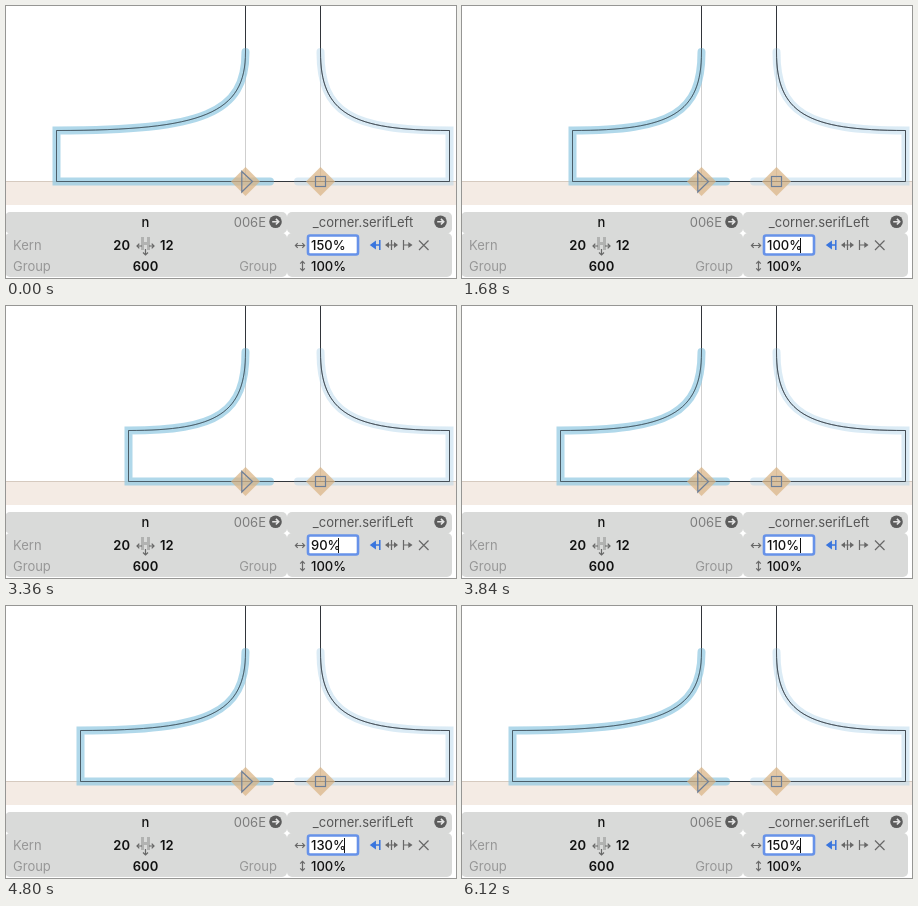
Recreate the animation shown at these times as an HTML page. Size 450 px wide and 272 px high, loop 6240 ms.

```html
<!DOCTYPE html>
<html lang="en">
<head>
<meta charset="utf-8">
<title>Corner component scale</title>
<style>
  html, body { margin: 0; width: 100%; height: 100%; overflow: hidden; background: #fff; }
  svg { display: block; width: 450px; height: 272px; }
  text { font: 500 13px Inter, sans-serif; fill: #111; }
  .dim { fill: #979797; font-weight: 400; }
  .mid { fill: #7c7c7c; font-weight: 400; }
  .name { fill: #555; font-weight: 400; }
  .bold { font-weight: 600; }
  .panel { fill: #d9dad9; }
  .line { fill: none; stroke: #33363b; stroke-width: 1; }
  .guide { stroke: #cfcfcf; stroke-width: 1; }
  .glow { fill: none; stroke-width: 8; stroke-linecap: round; stroke-linejoin: miter; }
  .node { fill: #d9b384; fill-opacity: .72; }
  .mark { fill: none; stroke: #6d7f98; stroke-width: 1.2; }
  .icon { fill: none; stroke: #686868; stroke-width: 1.2; }
  .head { fill: #686868; }
  .blue { stroke: #3975de; stroke-width: 1.5; }
  .blue.head { fill: #3975de; }
</style>
</head>
<body>
<svg viewBox="0 0 450 272">
  <defs>
    <g id="go">
      <circle r="6.3" fill="#5c5c5c"/>
      <path d="M-3.3 0H3M.4-2.8 3.2 0 .4 2.8" fill="none" stroke="#e4e4e4" stroke-width="1.6"/>
    </g>
    <path id="diamond" class="node" d="M0-14.5 14.5 0 0 14.5-14.5 0Z"/>
    <path id="sides" d="M-4.6 0H4.6M-2.3-2.3-4.6 0l2.3 2.3M2.3-2.3 4.6 0 2.3 2.3"/>
  </defs>

  <rect y="176" width="450" height="23" fill="#f4ebe4"/>
  <path class="guide" d="M0 175.5H450" style="stroke: #d6cabf"/>
  <path class="guide" d="M239.5 45V175M314.5 45V175"/>
  <path id="outline" class="line"/>
  <path id="rightGlow" class="glow" stroke="#a9d0e6" stroke-opacity=".42"/>
  <path id="leftGlow" class="glow" stroke="#8fc8e2" stroke-opacity=".7"/>
  <path id="core" class="line" stroke-opacity=".6"/>
  <use href="#diamond" x="239.5" y="175.5"/>
  <use href="#diamond" x="314.5" y="175.5"/>
  <path class="mark" d="M235.8 165.5 246.5 175.5 235.8 186Z"/>
  <rect class="mark" x="309.5" y="170.5" width="10" height="10"/>

  <rect class="panel" x="-1" y="206" width="282" height="21.5" rx="5"/>
  <rect class="panel" x="-1" y="227" width="282" height="44" rx="5"/>
  <rect class="panel" x="281" y="206" width="165" height="21.5" rx="5"/>
  <rect class="panel" x="281" y="227" width="165" height="44" rx="5"/>
  <path class="panel" d="M4 222H276V232H4ZM286 222H441V232H286Z"/>

  <text x="139.5" y="221" text-anchor="middle">n</text>
  <text class="mid" x="260" y="221" text-anchor="end">006E</text>
  <use href="#go" x="269.5" y="215.7"/>
  <text class="dim" x="7" y="244">Kern</text>
  <text class="bold" x="124" y="244" text-anchor="end">20</text>
  <text class="bold" x="154" y="244">12</text>
  <path d="M135 231h3v5h3v-5h3v13h-3v-5h-3v5h-3z" fill="#b1b2b1"/>
  <path class="icon" d="M131 240h5M133.3 237.7l-2.3 2.3 2.3 2.3M143 240h5M145.7 237.7l2.3 2.3-2.3 2.3M139.5 243v6M137 246.5l2.5 2.5 2.5-2.5"/>
  <text class="dim" x="7" y="265">Group</text>
  <text class="bold" x="139.5" y="265" text-anchor="middle">600</text>
  <text class="dim" x="271" y="265" text-anchor="end">Group</text>

  <text class="name" x="357" y="221" text-anchor="middle">_corner.serifLeft</text>
  <use href="#go" x="434.5" y="215.7"/>
  <use href="#sides" class="icon" x="294" y="239.5"/>
  <use href="#sides" class="icon" transform="translate(296.5 260) rotate(90)"/>
  <rect x="302" y="229.5" width="50" height="19" rx="2" fill="#fff" stroke="#6792e9" stroke-width="2.6"/>
  <text id="field" x="305" y="244"></text>
  <path id="caret" stroke="#111"/>
  <text x="305" y="265">100%</text>

  <path class="icon blue" d="M368 239H374M373.8 234v10"/>
  <path class="head blue" stroke="none" d="M365 239l4.2-3v6z"/>
  <path class="icon" d="M385.5 234v10M381 239h9"/>
  <path class="head" d="M379 239l4-3v6zM392 239l-4-3v6z"/>
  <path class="icon" d="M397.5 234v10M397.5 239h6"/>
  <path class="head" d="M406.5 239l-4.2-3v6z"/>
  <path class="icon" d="M413 234.5l9.5 9.5M422.5 234.5 413 244"/>
</svg>
<script>
  const LOOP = 6240, TICK = 120;
  // [start in ms, horizontal scale in percent]
  const steps = [
    [0, 150], [240, 140], [600, 130], [960, 120], [1320, 110],
    [1680, 100], [2040, 90], [2400, 80], [3000, 90], [3480, 100],
    [3840, 110], [4200, 120], [4680, 130], [5280, 140], [5880, 150]
  ];
  const LEFT = 239.5, RIGHT = 314.5, TOP = 46, SHELF = 124.5, BASE = 175.5;
  const INSET = 9; // part of the width that does not scale
  const $ = id => document.getElementById(id);
  const set = (id, d) => $(id).setAttribute('d', d);

  // Bracket curve and slab; side is -1 for left, 1 for right.
  function serif(x, side, scale) {
    const at = w => x + side * (INSET + w * scale);
    return `${x} ${TOP}C${x} ${TOP + 61} ${at(21)} ${SHELF} ${at(120)} ${SHELF}V${BASE}`;
  }

  function draw(percent, caretOn) {
    const left = serif(LEFT, -1, percent / 100), right = serif(RIGHT, 1, 1);
    const outline = `M${LEFT} 0L${left}H443.5M${RIGHT} 0L${right}`;
    set('leftGlow', `M${left}H264`);
    set('rightGlow', `M${right}H292`);
    set('outline', outline);
    set('core', outline);
    $('field').textContent = percent + '%';
    set('caret', `M${percent < 100 ? 332.5 : 338.5} 232V247`);
    $('caret').style.visibility = caretOn ? 'visible' : 'hidden';
  }

  let shown = -1;
  const start = performance.now();
  function frame(now) {
    const tick = Math.floor((Math.max(0, now - start) % LOOP) / TICK);
    if (tick !== shown) {
      shown = tick;
      const t = tick * TICK;
      const percent = steps.filter(s => s[0] <= t).pop()[1];
      draw(percent, t >= steps[1][0]);
    }
    requestAnimationFrame(frame);
  }
  frame(start);
</script>
</body>
</html>
```
